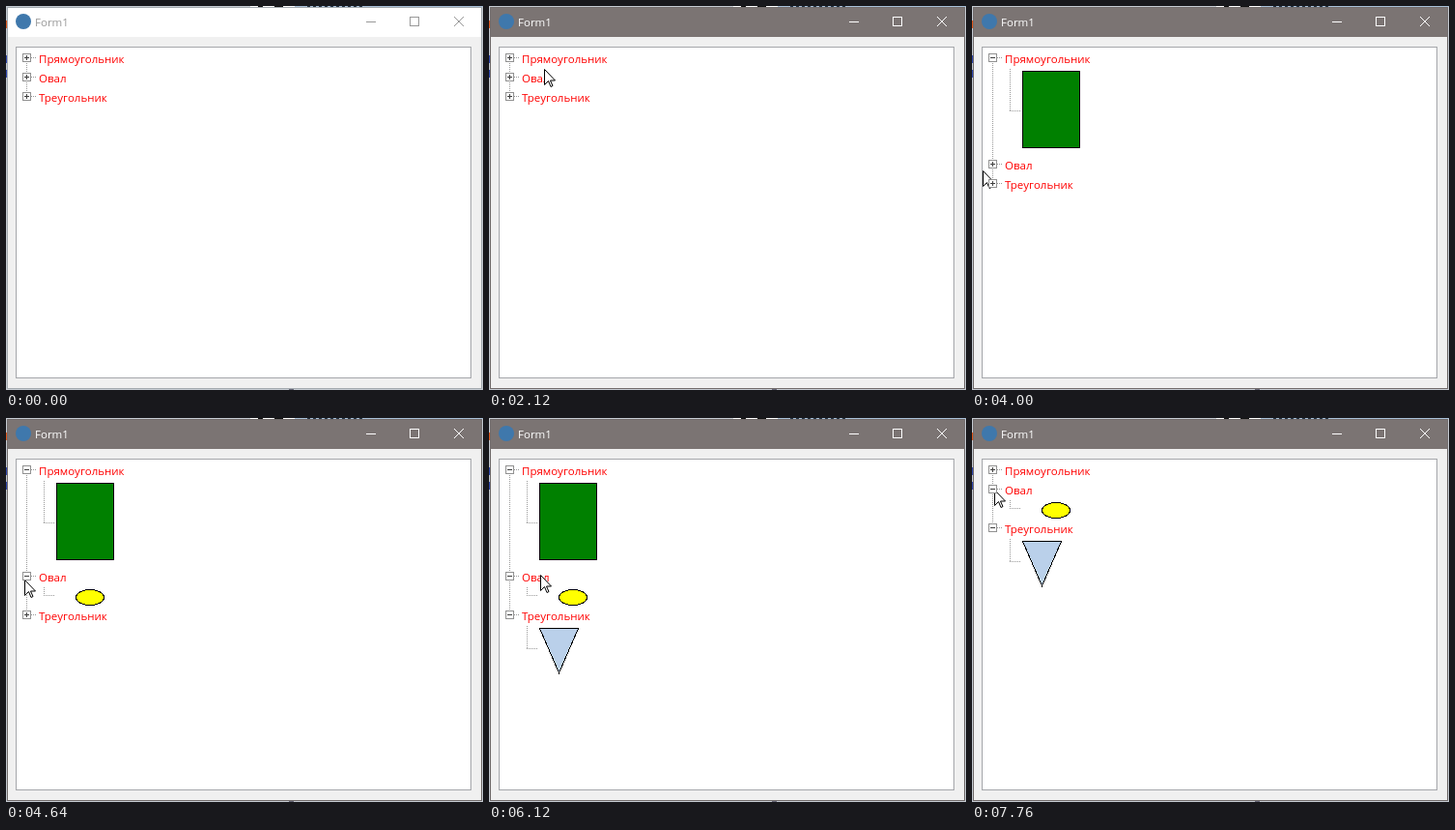
Write an HTML page that moves like this. It is 494 px wide and 397 px high and loops after 8000 ms.

```html
<!DOCTYPE html>
<html lang="ru">
<head>
<meta charset="utf-8">
<title>Form1</title>
<style>
  html, body { margin: 0; width: 100%; height: 100%; overflow: hidden; }
  body { position: relative; font: 11.5px/23px "Open Sans", "Noto Sans", sans-serif; }
  body * { position: absolute; box-sizing: border-box; }

  /* desktop slivers around the window */
  .desk {
    left: 0; top: 0; width: 494px; height: 397px;
    background:
      linear-gradient(#111, #111) 261px 0 / 5px 2px,
      linear-gradient(#111, #111) 278px 0 / 9px 3px,
      linear-gradient(#fff, #fff) 253px 0 / 46px 2px,
      repeating-linear-gradient(90deg, #234 0 3px, #a9c0d8 3px 6px) 312px 0 / 58px 1px,
      linear-gradient(#a9c0d8, #a9c0d8) 299px 0 / 195px 1px,
      linear-gradient(#e05a20, #e05a20) 0 15px / 1px 8px,
      linear-gradient(#3048b0, #3048b0) 0 51px / 1px 8px,
      linear-gradient(#3048b0, #3048b0) 0 66px / 1px 8px,
      linear-gradient(#667, #667) 293px 396px / 5px 1px,
      #c6ccd3;
    background-repeat: no-repeat;
  }

  .win {
    left: 1px; top: 1px; width: 492px; height: 395px;
    background: #f0f0f0; border: 1px solid #a3a9ae;
    animation: frame 8s step-end infinite;
  }
  .bar {
    left: 2px; top: 2px; width: 490px; height: 30px;
    background: #fff; color: #999;
    animation: bar 8s step-end infinite;
  }
  @keyframes frame { 17%, 100% { border-color: #716b6b; } }
  @keyframes bar { 17%, 100% { background: #7b7473; color: #fff; } }

  .icon { left: 8px; top: 6px; width: 16px; height: 16px; border-radius: 50%; background: #3f78ac; }
  .name { left: 28px; top: 3px; }
  .bar svg { left: 0; top: 0; fill: none; stroke: currentColor; }

  .tree { left: 10px; top: 42px; width: 472px; height: 343px; background: #fff; border: 1px solid #a5a7ab; }
  .tree > *, .kid { position: relative; }
  .row { position: relative; height: 20px; color: #f00; }
  .row span { left: 23px; top: 0; white-space: nowrap; }

  .node { --open: 0; }
  .node:nth-child(1) { animation: node1 8s step-end infinite; }
  .node:nth-child(2) { animation: node2 8s step-end infinite; }
  .node:nth-child(3) { animation: node3 8s step-end infinite; }
  @keyframes node1 { 0%, 87.5%, 100% { --open: 0; } 42.5% { --open: 1; } }
  @keyframes node2 { 0% { --open: 0; } 57.5%, 100% { --open: 1; } }
  @keyframes node3 { 0% { --open: 0; } 66%, 100% { --open: 1; } }

  /* dotted connectors */
  .node:not(:last-child)::before, .row::before, .kid::before, .kid::after {
    content: ""; position: absolute;
    background: repeating-linear-gradient(var(--dir, 180deg), #999 0 1px, transparent 1px 2px);
  }
  .node::before { left: 10px; top: 10px; width: 1px; height: 100%; }
  .row::before { --dir: 90deg; left: 15px; top: 10px; width: 5px; height: 1px; }
  .kid::before { left: 28px; top: 2px; width: 1px; height: calc(var(--h) / 2 - 2px); }
  .kid::after { --dir: 90deg; left: 28px; top: calc(var(--h) / 2); width: 11px; height: 1px; }

  .sign { left: 6px; top: 6px; width: 9px; height: 9px; background: #fff; border: 1px solid #919191; z-index: 1; }
  .sign::before, .sign::after { content: ""; position: absolute; background: #404040; }
  .sign::before { left: 1px; top: 3px; width: 5px; height: 1px; }
  .sign::after { left: 3px; top: 1px; width: 1px; height: 5px; opacity: calc(1 - var(--open)); }

  .kid { height: calc(var(--h) * var(--open)); opacity: var(--open); }
  .kid svg { left: 41px; top: 4px; overflow: visible; stroke: #000; shape-rendering: crispEdges; }

  .mouse { left: -40px; top: 0; width: 12px; height: 19px; animation: move 8s linear infinite; }
  @keyframes move {
    0%, 5.99% { left: -40px; top: 0; }
    6% { left: 472px; top: 194px; animation-timing-function: ease-out; }
    16%, 16.8% { left: 270px; top: 17px; }
    17% { left: 268px; top: 17px; animation-timing-function: ease-in-out; }
    26.5%, 34.2% { left: 57px; top: 65px; }
    39% { left: 9px; top: 38px; }
    42.5%, 44.2% { left: 22px; top: 50px; }
    50%, 50.4% { left: 11px; top: 170px; }
    52% { left: 13px; top: 175px; }
    55% { left: 11px; top: 145px; }
    57%, 57.6% { left: 19px; top: 161px; }
    61.5%, 63.49% { left: 16px; top: 216px; }
    63.5%, 65.8% { left: 18px; top: 204px; }
    67.5%, 68.4% { left: 22px; top: 205px; }
    69.5% { left: 7px; top: 215px; }
    71.5% { left: 48px; top: 253px; }
    73.8% { left: 106px; top: 225px; }
    76%, 76.2% { left: 55px; top: 173px; }
    79.5% { left: 31px; top: 62px; }
    81%, 82.7% { left: 41px; top: 48px; }
    84.5%, 86.49% { left: 19px; top: 56px; }
    86.5%, 87.5% { left: 18px; top: 56px; }
    90.5% { left: 6px; top: 44px; }
    96.5%, 96.99% { left: 23px; top: 80px; }
    97%, 100% { left: 23px; top: 74px; }
  }
</style>
</head>
<body>
  <div class="desk"></div>
  <div class="win"></div>
  <div class="bar">
    <i class="icon"></i>
    <span class="name">Form1</span>
    <svg width="490" height="30">
      <path d="M371 14.5h10M416.500 9.500h9v9h-9z" shape-rendering="crispEdges"/>
      <path d="M462 9l10 10M472 9l-10 10"/>
    </svg>
  </div>

  <div class="tree">
    <div class="node">
      <div class="row"><i class="sign"></i><span>Прямоугольник</span></div>
      <div class="kid" style="--h: 90px">
        <svg width="60" height="80"><rect x=".5" y=".5" width="59" height="79" fill="#008000"/></svg>
      </div>
    </div>
    <div class="node">
      <div class="row"><i class="sign"></i><span>Овал</span></div>
      <div class="kid" style="--h: 20px">
        <svg width="60" height="18"><ellipse cx="35" cy="8.500" rx="14.500" ry="8" fill="#ff0"/></svg>
      </div>
    </div>
    <div class="node">
      <div class="row"><i class="sign"></i><span>Треугольник</span></div>
      <div class="kid" style="--h: 50px">
        <svg width="42" height="48"><path d="M.5 .5h40l-20 46z" fill="#bad0ea"/></svg>
      </div>
    </div>
  </div>

  <svg class="mouse" viewBox="0 0 12 19">
    <path d="M.5 .5v16l4-4 2.500 6 2-1-2.500-5.500h5z" fill="#fff" stroke="#000"/>
  </svg>
</body>
</html>
```
